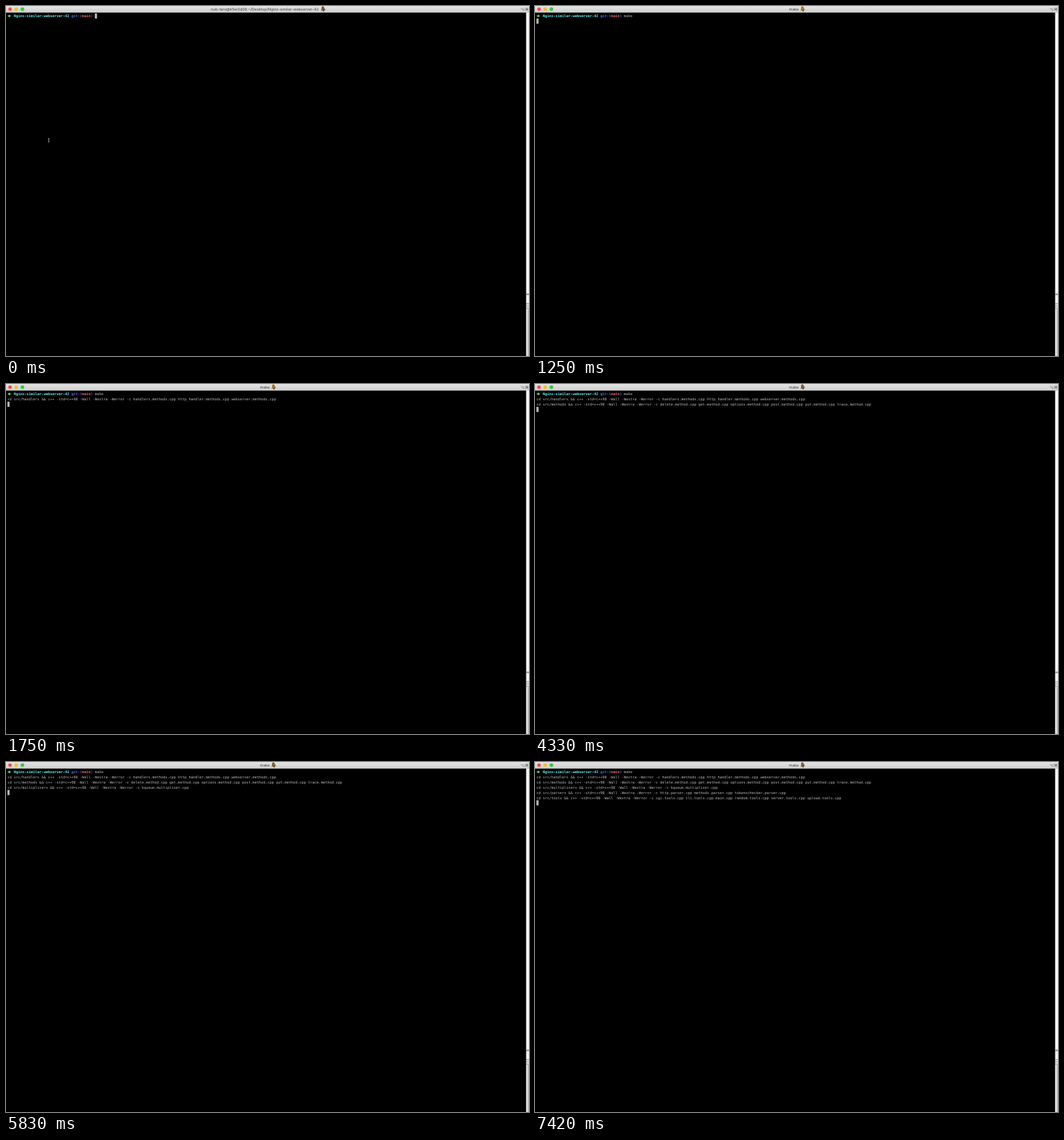
Recreate the animation shown at these times as an HTML page with a canvas. Size 800x535 px, loop 8000 ms.

```html
<!DOCTYPE html>
<html lang="en">
<head>
<meta charset="utf-8">
<title>Terminal build</title>
<style>
  html, body { margin: 0; width: 100%; height: 100%; overflow: hidden; background: #000; }
  canvas { display: block; }
</style>
</head>
<body>
<canvas id="stage" width="800" height="535"></canvas>
<script>
const ctx = document.getElementById('stage').getContext('2d');

const LOOP = 8000;
const CELL = 3.262;
const ROW = 7.85;
const LEFT = 2.2;
const TOP = 11.35;
const MONO = '"DejaVu Sans Mono", monospace';
const SANS = 'Inter, sans-serif';
const FLAGS = '&& c++ -std=c++98 -Wall -Wextra -Werror -c';
const PROMPT_CELLS = 41;

const output = [
  [1750, `cd src/handlers ${FLAGS} handlers.methods.cpp http_handler.methods.cpp webserver.methods.cpp`],
  [4000, `cd src/methods ${FLAGS} delete.method.cpp get.method.cpp options.method.cpp post.method.cpp put.method.cpp trace.method.cpp`],
  [5830, `cd src/multiplixers ${FLAGS} kqueue.multiplixer.cpp`],
  [6330, `cd src/parsers ${FLAGS} http.parser.cpp methods.parser.cpp tokenschecker.parser.cpp`],
  [7420, `cd src/tools ${FLAGS} cgi.tools.cpp cli.tools.cpp main.cpp random.tools.cpp server.tools.cpp upload.tools.cpp`],
];

function rect(x, y, w, h, color) {
  ctx.fillStyle = color;
  ctx.fillRect(x, y, w, h);
}

function disc(x, y, r, color) {
  ctx.fillStyle = color;
  ctx.beginPath();
  ctx.arc(x, y, r, 0, Math.PI * 2);
  ctx.fill();
}

// Large type scaled down keeps fractional advances exact.
function text(str, x, y, size, family, color, weight = 400) {
  ctx.save();
  ctx.translate(x, y);
  ctx.scale(0.1, 0.1);
  ctx.font = `${weight} ${size * 10}px ${family}`;
  ctx.textRendering = 'geometricPrecision';
  ctx.fillStyle = color;
  ctx.fillText(str, 0, 0);
  ctx.restore();
}

function termText(str, col, row, color, weight) {
  text(str, LEFT + col * CELL, TOP + row * ROW + 5.9, CELL / 0.602, MONO, color, weight);
}

function cursor(col, row) {
  rect(LEFT + col * CELL, TOP + row * ROW, CELL, ROW, '#b9bdb9');
}

function bell(x, color) {
  ctx.save();
  ctx.translate(x, 4.4);
  ctx.rotate(-0.2);
  ctx.scale(1.12, 1.12);
  ctx.fillStyle = color;
  ctx.beginPath();
  ctx.moveTo(-3.4, 2.2);
  ctx.quadraticCurveTo(-2, 1, -2, -1);
  ctx.quadraticCurveTo(-1.6, -3.6, 0, -3.6);
  ctx.quadraticCurveTo(1.6, -3.6, 2, -1);
  ctx.quadraticCurveTo(2, 1, 3.4, 2.2);
  ctx.closePath();
  ctx.fill();
  disc(0.2, 2.6, 1, '#5b3a1c');
  ctx.restore();
}

function titleBar(t) {
  const shade = ctx.createLinearGradient(0, 0, 0, 10);
  shade.addColorStop(0, '#e4e4e4');
  shade.addColorStop(1, '#cecece');
  rect(0, 0, 800, 10, shade);
  rect(0, 9.6, 800, 0.6, '#a8a8a8');

  disc(6.2, 4.7, 2.8, '#fb5b54');
  disc(15.6, 4.7, 2.8, '#f6bb38');
  disc(25.1, 4.7, 2.8, '#35c648');
  disc(6.2, 4.7, 0.8, '#8f211b');

  if (t < 920) {
    text('nub-taro@k5w3d08:~/Desktop/Nginx-similar-webserver-42', 313.3, 6.8, 5.8, SANS, '#404040');
    bell(485, '#80503a');
  } else {
    text('make', 388.6, 6.8, 5.8, SANS, '#404040');
    bell(409.3, t < 4170 ? '#a9752c' : '#7d6035');
  }
  text('⌥⌘1', 787, 6.8, 5.8, '"DejaVu Sans", sans-serif', '#404040');
}

function sideStrip() {
  rect(795.6, 10, 4.4, 525, '#f4f4f4');
  rect(796, 439.5, 4, 2.5, '#9c9c9c');
  for (const y of [454.5, 457.7, 461]) rect(796, y, 4, 1.5, '#a0a0a0');
  rect(797.6, 463, 2.4, 72, '#bdbdbd');
}

function pointer(x, y) {
  rect(x - 0.4, y - 2.5, 0.8, 5, '#c4c4c4');
  for (const end of [-3, 2.4]) rect(x - 1.3, y + end, 2.6, 0.7, '#b0b0b0');
}

function arrow(x, y, color) {
  rect(x, y - 0.8, 2.6, 1.6, color);
  ctx.beginPath();
  ctx.moveTo(x + 1.9, y - 2.3);
  ctx.lineTo(x + 4.7, y);
  ctx.lineTo(x + 1.9, y + 2.3);
  ctx.fill();
}

function prompt() {
  arrow(2.8, 15.3, '#62f268');
  termText('Nginx-similar-webserver-42', 3, 0, '#5ff0f2', 700);
  termText('git:(', 30, 0, '#5d68ea', 700);
  termText('main', 35, 0, '#f06a64', 700);
  termText(')', 39, 0, '#5d68ea', 700);
}

function draw(t) {
  rect(0, 0, 800, 535, '#000');
  titleBar(t);
  sideStrip();
  prompt();

  const typed = 'make'.slice(0, t < 500 ? 0 : t < 580 ? 2 : 4);
  termText(typed, PROMPT_CELLS, 0, '#bdbdbd');
  if (t < 80) pointer(65.3, 205.2);

  const lines = output.filter(([start]) => t >= start);
  lines.forEach(([, line], i) => termText(line, 0, i + 1, '#bdbdbd'));

  if (t < 830) cursor(PROMPT_CELLS + typed.length, 0);
  else cursor(0, lines.length + 1);
}

function frame() {
  draw(performance.now() % LOOP);
  requestAnimationFrame(frame);
}
frame();
</script>
</body>
</html>
```
